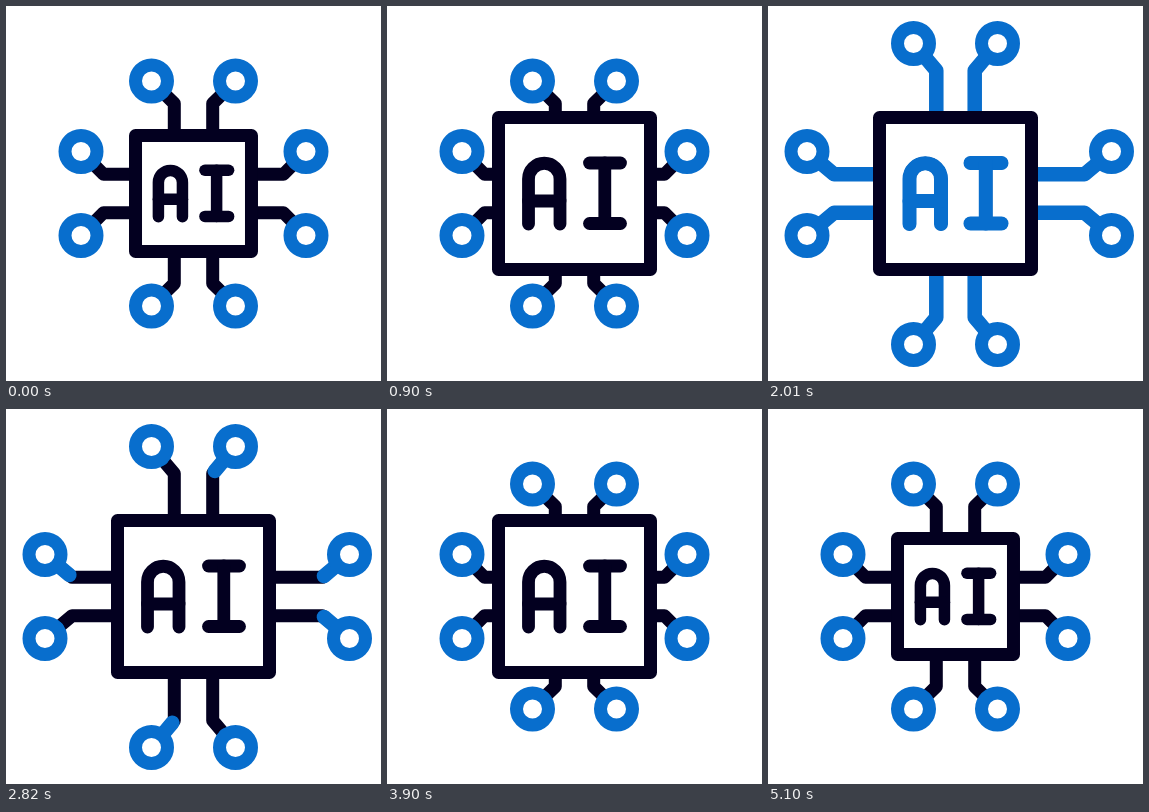
Animation, 375 px wide and 375 px high, one loop 5.4 s. Source, as an HTML page with a canvas:

```html
<!DOCTYPE html>
<html lang="en">
<head>
<meta charset="utf-8">
<title>Chip</title>
<style>
  html, body { margin: 0; width: 100%; height: 100%; overflow: hidden; background: #fff; }
  canvas { display: block; width: 375px; height: 375px; }
</style>
</head>
<body>
<canvas id="stage" width="375" height="375"></canvas>
<script>
const LOOP = 5400;
const DARK = '#030020', BLUE = '#086ecd';
const ctx = document.getElementById('stage').getContext('2d');

// How far the circles of each side slide out: top, right, bottom, left
const REACH = [37.5, 43.5, 38.5, 36];

// Letter strokes at full size: path data and length
const LETTERS = [
  ['M-46 30.5V-14.5A15.75 15.75 0 0 1 -14.5 -14.5V30.5', 139.5],
  ['M-46 7.5H-14.5', 31.5],
  ['M15 -30.5H46', 31],
  ['M30.3 -30.5V30', 60.5],
  ['M15 30H46', 31]
];

const ease = (t, from, to) => {
  const k = Math.min(1, Math.max(0, (t - from) / (to - from)));
  return 0.5 - 0.5 * Math.cos(Math.PI * k);
};

const mix = (a, b, k) => a + (b - a) * k;

function stroke(path, color, width) {
  ctx.strokeStyle = color;
  ctx.lineWidth = width;
  ctx.stroke(path);
}

// Strokes only the part of a path between two fractions of its length
function strokePart(path, length, from, to, width) {
  if (to - from < 0.002) return;
  ctx.setLineDash([length * (to - from), 999]);
  ctx.lineDashOffset = -length * from;
  stroke(path, BLUE, width);
  ctx.setLineDash([]);
}

function drawLeg(t, side, mirror, out) {
  const shift = REACH[side] * out;
  const ringY = -112.5 - shift;
  const bendY = -90 - shift + 4.5 * out;
  const dx = 42 - 19.2, dy = ringY - bendY;
  const diagonal = Math.hypot(dx, dy);
  const k = (diagonal - 14) / diagonal;

  const leg = new Path2D();
  leg.moveTo(mirror * 19.2, -60);
  leg.lineTo(mirror * 19.2, bendY);
  leg.lineTo(mirror * (19.2 + dx * k), bendY + dy * k);
  stroke(leg, DARK, 13);

  const late = mirror > 0 || side === 1 ? 150 : 0;
  const length = -60 - bendY + diagonal - 14;
  strokePart(leg, length, ease(t, 2200 + late, 2880 + late), ease(t, 1500, 2040), 14.5);

  const ring = new Path2D();
  ring.arc(mirror * 42, ringY, 16, 0, 2 * Math.PI);
  ctx.fill(ring);
  stroke(ring, BLUE, 13);
}

function drawLetters(t, grow, scale) {
  const size = new DOMMatrix().scale(scale);
  const width = mix(11.5, 12.8, grow);
  const from = ease(t, 2100, 2700), to = ease(t, 1500, 1980);
  const parts = LETTERS.map(([data, length]) => {
    const path = new Path2D();
    path.addPath(new Path2D(data), size);
    return [path, length * scale];
  });
  parts.forEach(([path]) => stroke(path, DARK, width));
  parts.forEach(([path, length]) => strokePart(path, length + 1, from, to, 14));
}

function draw(t) {
  const grow = ease(t, 0, 900) - ease(t, 3900, 4800);
  const out = ease(t, 900, 1500) - ease(t, 3300, 3900);
  const scale = mix(0.763, 1, grow);

  ctx.setTransform(1, 0, 0, 1, 0, 0);
  ctx.fillStyle = '#fff';
  ctx.fillRect(0, 0, 375, 375);
  ctx.translate(187.5, 187.5);
  ctx.lineCap = ctx.lineJoin = 'round';

  ctx.save();
  ctx.rotate((grow - 1) * Math.PI / 2);
  for (let side = 0; side < 4; side++) {
    drawLeg(t, side, -1, out);
    drawLeg(t, side, 1, out);
    ctx.rotate(Math.PI / 2);
  }
  ctx.restore();

  const half = 76 * scale;
  const box = new Path2D();
  box.rect(-half, -half, 2 * half, 2 * half);
  ctx.fill(box);
  stroke(box, DARK, 13);

  drawLetters(t, grow, scale);
}

function tick() {
  draw(performance.now() % LOOP);
  requestAnimationFrame(tick);
}
tick();
</script>
</body>
</html>
```
